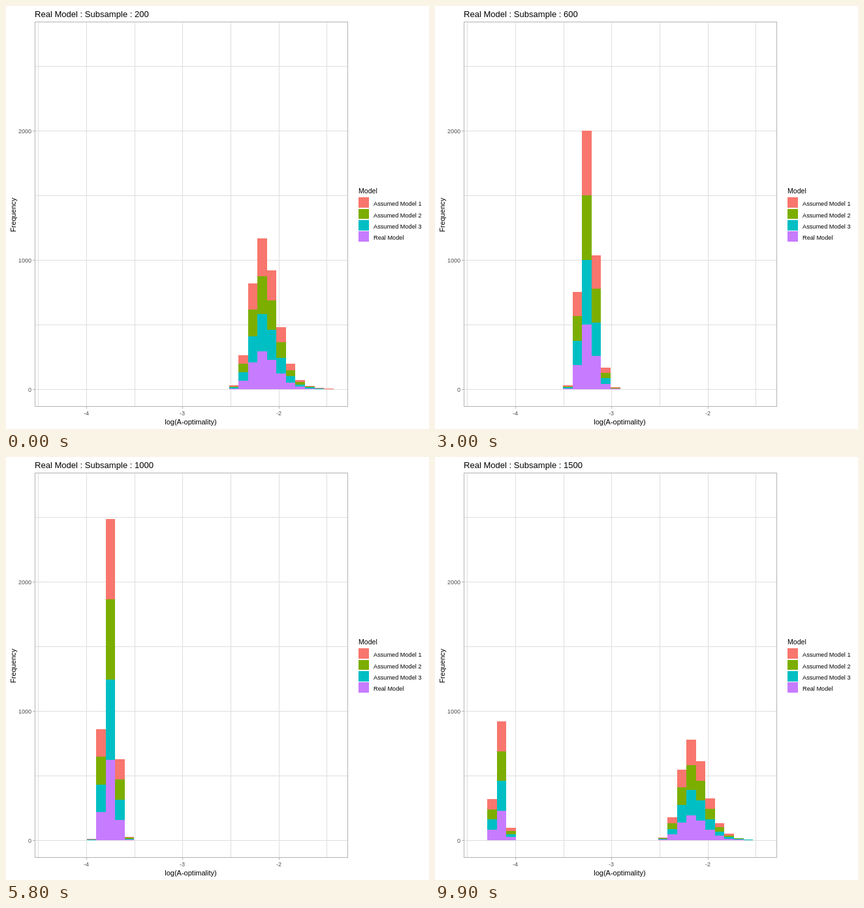
Write an HTML page that moves like this. It is 648x648 px and loops after 10000 ms.

```html
<!DOCTYPE html>
<html lang="en">
<head>
<meta charset="utf-8">
<title>Subsample histogram</title>
<style>
  html, body { margin: 0; width: 100%; height: 100%; overflow: hidden; background: #fff; }
  svg { display: block; width: 648px; height: 648px; font-family: "Liberation Sans", Arial, sans-serif; }
  rect { shape-rendering: crispEdges; }
</style>
</head>
<body>
<svg id="chart" viewBox="0 0 648 648"></svg>
<script>
const svg = document.getElementById('chart');
const LAYERS = [
  ['Real Model', '#C77CFF'],
  ['Assumed Model 3', '#00BFC4'],
  ['Assumed Model 2', '#7CAE00'],
  ['Assumed Model 1', '#F8766D']
];
const BINS = 30, STATES = 14, TOTAL = 4000, LOOP = 10000, STEP = 100, BASE = 587;
const GRID = '#DEDEDE', EDGE = '#B3B3B3', GREY = { fill: '#4D4D4D' };

// Standard normal distribution function, tanh approximation.
const phi = z => 0.5 * (1 + Math.tanh(0.79788 * (z + 0.044715 * z ** 3)));

// Right-skewed bell: larger subsamples shift it left and narrow it.
function histogram(size) {
  const r = size / 200;
  const median = 22.76 - 10.15 * Math.log(r);
  const slope = 0.738 * r ** 0.55;
  const skew = 1.3 / Math.sqrt(size);
  const below = x => {
    const u = (x - median) * slope;
    return phi(u - skew * u * u);
  };
  return Array.from({ length: BINS }, (_, b) => TOTAL * Math.max(0, below(b + 1) - below(b)));
}
const sizeOf = i => 200 + 100 * i;
const counts = Array.from({ length: STATES }, (_, i) => histogram(sizeOf(i)));

const binX = b => Math.round(65.45 + 14.54 * b);
const countY = n => Math.round(BASE - n * 0.198);

function add(tag, attrs, text) {
  const el = document.createElementNS('http://www.w3.org/2000/svg', tag);
  for (const k in attrs) el.setAttribute(k, attrs[k]);
  if (text) el.textContent = text;
  return svg.appendChild(el);
}
const box = (x, y, width, height, fill) => add('rect', { x, y, width, height, fill });
const label = (x, y, size, text, more) =>
  add('text', { x, y, 'font-size': size, fill: '#000', ...more }, text);

box(0, 0, 648, 648, '#fff');
for (let i = 0; i < 7; i++) box(Math.round(49.2 + 73.7 * i), 24, 1, 589, GRID);
for (let i = 0; i < 6; i++) box(44, 92 + 99 * i, 479, 1, GRID);

const bars = Array.from({ length: BINS }, (_, b) =>
  LAYERS.map(([, fill]) => box(binX(b), BASE, binX(b + 1) - binX(b), 0, fill)));

add('rect', { x: 44.5, y: 24.5, width: 479, height: 589, fill: 'none', stroke: EDGE });
[2000, 1000, 0].forEach((n, i) => {
  const y = 191 + 198 * i;
  box(41, y, 3, 1, EDGE);
  label(39, y + 4, 9, String(n), { ...GREY, 'text-anchor': 'end' });
});
[-4, -3, -2].forEach((n, i) => {
  const x = Math.round(122.9 + 147.4 * i);
  box(x, 614, 1, 3, EDGE);
  label(x, 627, 9, String(n), { ...GREY, 'text-anchor': 'middle' });
});
label(283, 641, 11, 'log(A-optimality)', { 'text-anchor': 'middle' });
label(0, 0, 11.1, 'Frequency', { 'text-anchor': 'middle', transform: 'translate(15 320) rotate(-90)' });

label(540, 287, 10.6, 'Model');
[...LAYERS].reverse().forEach(([name, fill], i) => {
  const top = 293.3 + 17.28 * i, y = Math.round(top);
  box(540, y, 16, Math.round(top + 15.8) - y, fill);
  label(563, y + 13, 9.2, name);
});
const title = label(44, 17, 13.05, ' ');

// Tick at which state i starts to give way to the next one.
const leaveTick = i => 4 + 8 * i - Math.max(0, i - 3);

function draw(ms) {
  const tick = Math.floor((ms % LOOP) / STEP), last = STATES - 1;
  let i = last;
  while (i > 0 && leaveTick(i) > tick) i--;
  const p = Math.max(0, Math.min(1, (tick - leaveTick(i) + 1) / (i < 3 ? 4 : 3)));
  const from = counts[i], to = counts[(i + 1) % STATES];
  const shown = i < last && p >= 0.5 ? i + 1 : i;
  title.textContent = `Real Model : Subsample : ${sizeOf(shown)}`;
  bars.forEach((stack, b) => {
    const count = from[b] + (to[b] - from[b]) * p;
    let base = BASE;
    stack.forEach((r, k) => {
      const top = countY(count * (k + 1) / LAYERS.length);
      r.setAttribute('y', top);
      r.setAttribute('height', base - top);
      base = top;
    });
  });
}

const start = performance.now();
function loop() {
  draw(performance.now() - start);
  requestAnimationFrame(loop);
}
loop();
</script>
</body>
</html>
```
